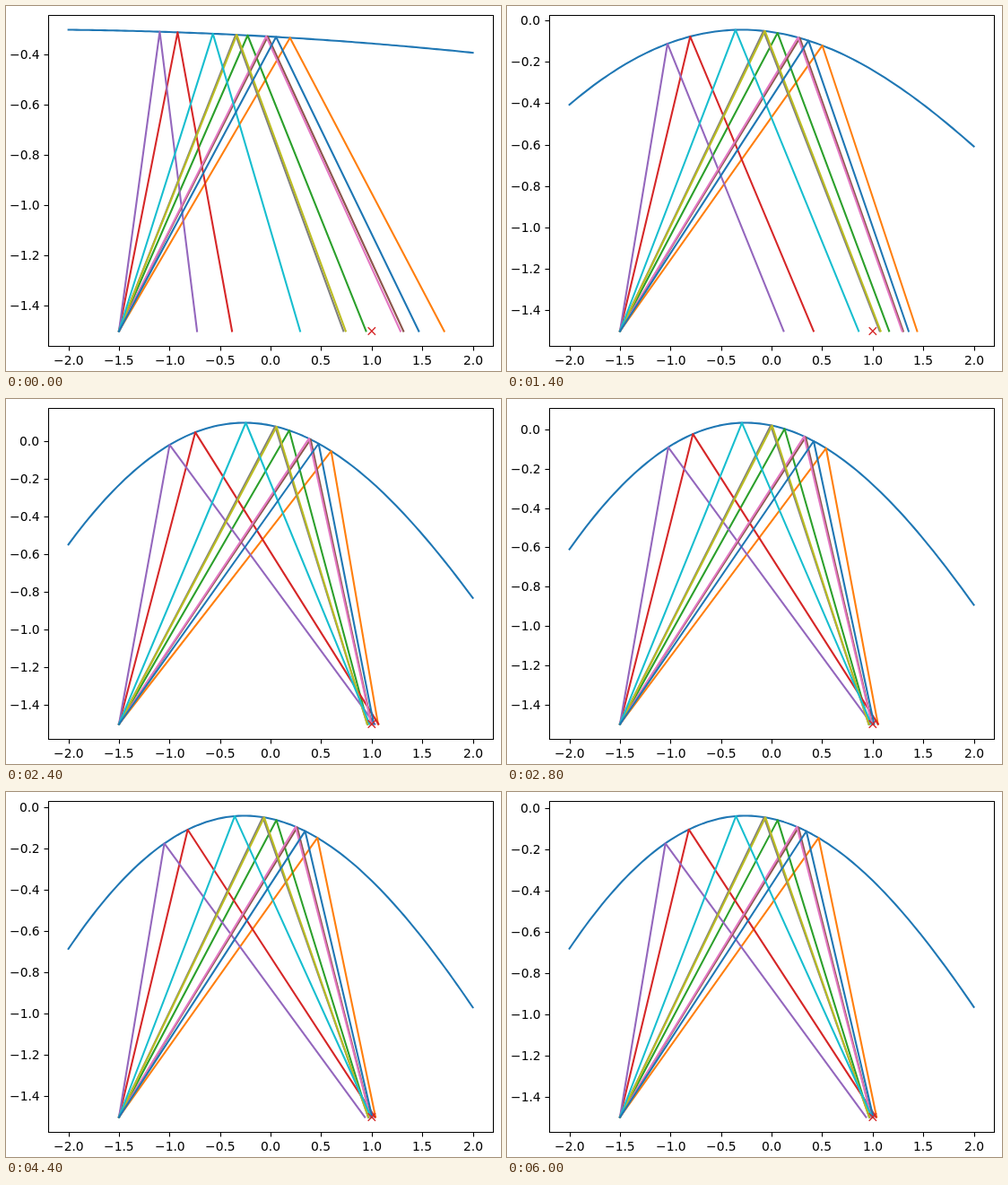
An HTML page with a canvas that plays this animation: 552x407 px, repeating every 6200 ms.

```html
<!DOCTYPE html>
<html lang="en">
<head>
<meta charset="utf-8">
<title>Mirror fit</title>
<style>
html, body { margin: 0; width: 100%; height: 100%; overflow: hidden; background: #fff; }
canvas { display: block; }
</style>
</head>
<body>
<canvas id="plot" width="552" height="407"></canvas>
<script>
const ctx = document.getElementById('plot').getContext('2d');
const STEP = 200, STEPS = 31;
const LEFT = 47.5, RIGHT = 543.5, TOP = 10.5, BOTTOM = 379.5;
const CENTER = 295.1, UNIT = 112.73;   // pixel column of x = 0, pixels per x unit
const BASE = 362.5, SPAN = 336;        // pixel row of the floor, height of the data
const FLOOR = -1.5, SOURCE = -1.5, GOAL = 1;
const BLUE = '#1f77b4', RED = '#d62728';

// Rays by colour, with their run per unit of rise
const RAYS = {
  '#ff7f0e': 1.4515, '#2ca02c': 1.083, [RED]: 0.4885, '#9467bd': 0.3387, '#8c564b': 1.257,
  '#e377c2': 1.243, '#7f7f7f': 0.98, '#bcbd22': 0.99, '#17becf': 0.786, [BLUE]: 1.3295
};

// The mirror is a polynomial that bends from one shape to the other (x^1 to x^4)
const FLAT = [-0.0228, -0.0046, 0, 0], BENT = [-0.108, -0.205, 0.0093, 0.003];
const BEND_STEPS = 9;

// Its height at x = 0 overshoots and settles: [step, height]
const HEIGHTS = [
  [0, -0.33], [4, -0.2856], [9, 0.0745], [14, 0.0207],
  [16, -0.077], [18, -0.0569], [20, -0.056], [30, -0.0525]
];

// Smooth curve through points, with weighted slopes at each point
function spline(points, t) {
  const last = points.length - 1;
  const gap = i => points[i + 1][0] - points[i][0];
  const slope = i => (points[i + 1][1] - points[i][1]) / gap(i);
  const tangent = i => i === 0 ? slope(0) : i === last ? slope(last - 1) :
    (gap(i) * slope(i - 1) + gap(i - 1) * slope(i)) / (gap(i - 1) + gap(i));
  let i = 0;
  while (i < last - 1 && t >= points[i + 1][0]) i++;
  const h = gap(i), u = (t - points[i][0]) / h, v = 1 - u;
  return v * v * (1 + 2 * u) * points[i][1] + u * u * (3 - 2 * u) * points[i + 1][1] +
    h * u * v * (v * tangent(i) - u * tangent(i + 1));
}

function mirrorAt(step) {
  const bend = Math.min(1, step / BEND_STEPS) ** 2.2;
  return [spline(HEIGHTS, step), ...FLAT.map((c, i) => c + (BENT[i] - c) * bend)];
}

const height = (p, x) => p.reduceRight((sum, c) => sum * x + c, 0);
const gradient = (p, x) => height(p.slice(1).map((c, i) => c * (i + 1)), x);

// Source, point on the mirror (by Newton's method) and landing point of one ray
function trace(p, run) {
  let rise = 1.4;
  for (let i = 0; i < 6; i++) {
    const x = SOURCE + run * rise;
    rise -= (FLOOR + rise - height(p, x)) / (1 - run * gradient(p, x));
  }
  const x = SOURCE + run * rise;
  const out = Math.atan(run) + 2 * Math.atan(gradient(p, x));
  return [[SOURCE, FLOOR], [x, FLOOR + rise], [x + rise * Math.tan(out), FLOOR]];
}

function stroke(points, color, width) {
  ctx.beginPath();
  points.forEach(([x, y]) => ctx.lineTo(x, y));
  ctx.strokeStyle = color;
  ctx.lineWidth = width;
  ctx.stroke();
}

const snap = v => Math.round(v) + 0.5;

// Tick label whose left edge lies on a whole pixel; align is 0.5 for centre, 1 for right
function label(value, x, y, align) {
  const text = (value < -0.01 ? '\u2212' : '') + Math.abs(value).toFixed(1);
  ctx.fillText(text, Math.round(x - ctx.measureText(text).width * align), y);
}

function drawAxes(toX, toY) {
  ctx.fillStyle = '#000';
  ctx.strokeStyle = '#000';
  ctx.lineWidth = 1.1;
  ctx.strokeRect(LEFT, TOP, RIGHT - LEFT, BOTTOM - TOP);
  ctx.font = '13.89px "DejaVu Sans", sans-serif';
  for (let v = -2; v <= 2; v += 0.5) {
    const x = snap(toX(v));
    stroke([[x, BOTTOM], [x, BOTTOM + 5]], '#000', 1.1);
    label(v, toX(v), 400, 0.5);
  }
  for (let n = -7; toY(n / 5) >= TOP - 0.8; n++) {
    const y = snap(toY(n / 5));
    stroke([[LEFT - 5, y], [LEFT, y]], '#000', 1.1);
    label(n / 5, 37.5, Math.round(toY(n / 5) + 5), 1);
  }
}

function draw(step) {
  const p = mirrorAt(step);
  const curve = Array.from({ length: 101 }, (_, i) => [i / 25 - 2, height(p, i / 25 - 2)]);
  const peak = Math.max(...curve.map(q => q[1]));
  const toX = x => CENTER + UNIT * x;
  const toY = y => BASE - (y - FLOOR) * SPAN / (peak - FLOOR);
  const line = (points, color) =>
    stroke(points.map(([x, y]) => [toX(x), toY(y)]), color, 2.083);

  ctx.fillStyle = '#fff';
  ctx.fillRect(0, 0, 552, 407);
  ctx.lineCap = 'square';
  ctx.lineJoin = 'round';
  line(curve, BLUE);
  for (const color in RAYS) line(trace(p, RAYS[color]), color);

  ctx.lineCap = 'butt';
  const x = toX(GOAL), r = 4.17;
  for (const d of [r, -r]) stroke([[x - r, BASE - d], [x + r, BASE + d]], RED, 1.39);
  drawAxes(toX, toY);
}

const start = performance.now();
function tick() {
  draw(Math.floor((performance.now() - start) / STEP) % STEPS);
  requestAnimationFrame(tick);
}
tick();
</script>
</body>
</html>
```
